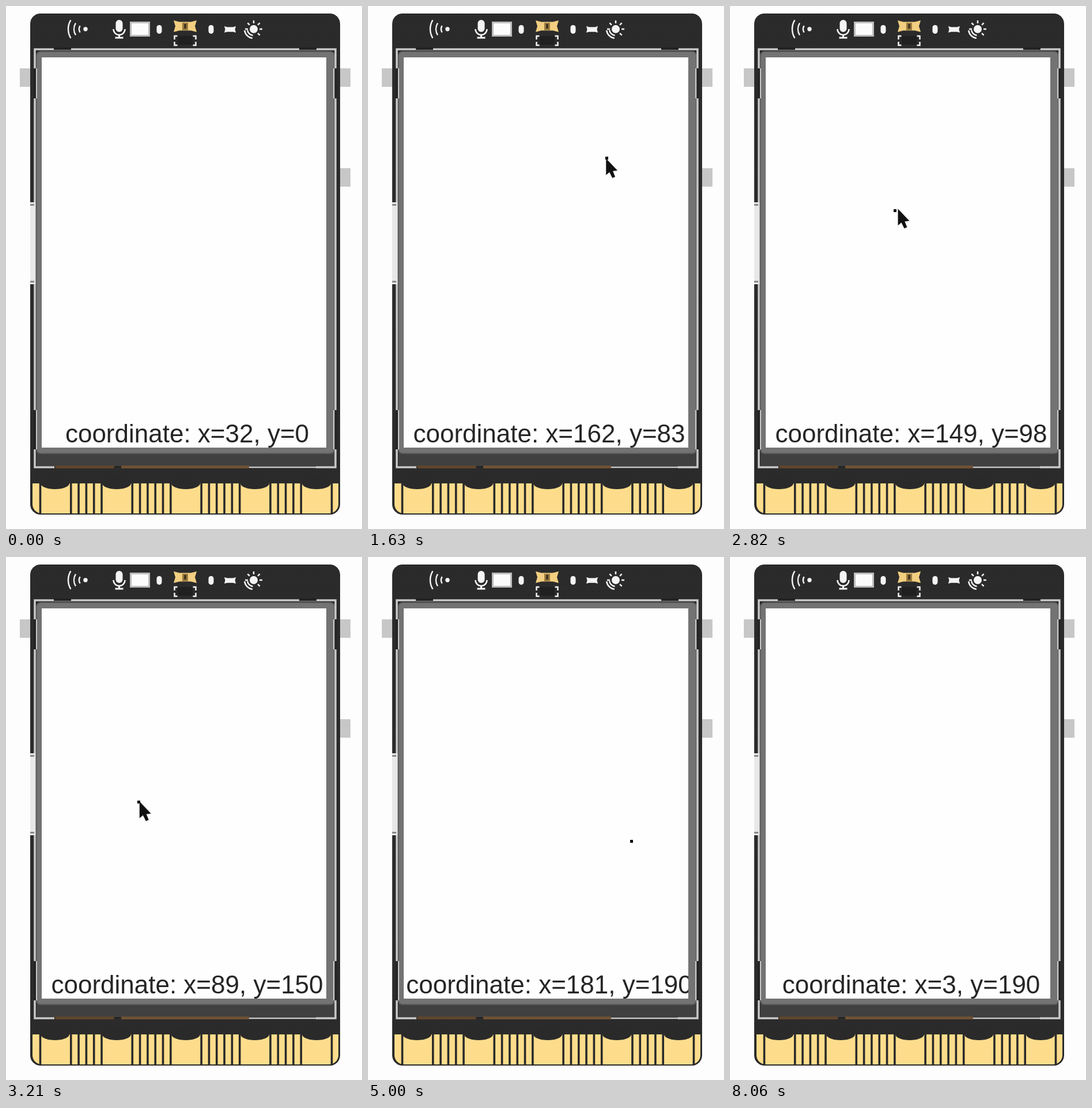
Write an HTML page with a canvas that moves like this. It is 618x906 px and loops after 8.19 s.

```html
<!DOCTYPE html>
<html lang="en">
<head>
<meta charset="utf-8">
<title>Touch coordinates</title>
<style>
html, body { margin: 0; width: 100%; height: 100%; overflow: hidden; background: #fdfdfd; }
canvas { display: block; }
</style>
</head>
<body>
<canvas id="stage" width="618" height="906"></canvas>
<script>
const LOOP = 8190, REFRESH = 100, POINTER_END = 3400, RELEASE = 7100;
const MIDDLE = 311;
const INK = '#f4f4f4', SILVER = '#c9c9c9', DARK = '#2a2a2a';
const stage = document.getElementById('stage');
const view = stage.getContext('2d');
const board = document.createElement('canvas');
board.width = stage.width;
board.height = stage.height;
const art = board.getContext('2d');

// Turning points of the touch in device pixels
const path = [
  { t: 100, x: 32, y: 0 },
  { t: 1500, x: 162, y: 83 },
  { t: 1600, x: 171, y: 82 },
  { t: 2700, x: 149, y: 98 },
  { t: 2800, x: 109, y: 125 },
  { t: 3600, x: 55, y: 191 },
  { t: 4700, x: 90, y: 192 },
  { t: 4900, x: 181, y: 190 },
  { t: 5000, x: 192, y: 190 },
  { t: 5900, x: 195, y: 190 },
  { t: 6600, x: 188, y: 190 },
  { t: RELEASE, x: 3, y: 190 }
];

function touchAt(t) {
  const next = path.findIndex(p => p.t >= t);
  if (next <= 0) return path.at(next);
  const a = path[next - 1], b = path[next];
  const k = (t - a.t) / (b.t - a.t);
  return { x: Math.round(a.x + (b.x - a.x) * k), y: Math.round(a.y + (b.y - a.y) * k) };
}

const toStage = p => ({ x: 62 + p.x * 2.06, y: 90.7 + p.y * 2.1125 });

function rect(color, x0, y0, x1, y1, radius = 0) {
  art.fillStyle = color;
  art.beginPath();
  art.roundRect(x0, y0, x1 - x0, y1 - y0, radius);
  art.fill();
}

function polygon(ctx, color, points) {
  ctx.fillStyle = color;
  ctx.beginPath();
  points.forEach(([x, y]) => ctx.lineTo(x, y));
  ctx.closePath();
  ctx.fill();
}

function line(color, width, ...points) {
  art.strokeStyle = color;
  art.lineWidth = width;
  art.beginPath();
  points.forEach(([x, y]) => art.lineTo(x, y));
  art.stroke();
}

function arc(x, y, r, from, to) {
  art.strokeStyle = INK;
  art.lineWidth = 2.5;
  art.beginPath();
  art.arc(x, y, r, from, to);
  art.stroke();
}

function disc(color, x, y, rx, ry = rx) {
  art.fillStyle = color;
  art.beginPath();
  art.ellipse(x, y, rx, ry, 0, 0, 7);
  art.fill();
}

// Bar with flared ends and a narrower waist
function bow(color, x, y, w, h) {
  const quarter = (sx, sy) => [[w, h], [w * 0.5, h * 0.75]].map(([a, b]) => [x + sx * a, y + sy * b]);
  polygon(art, color, [
    ...quarter(-1, -1), ...quarter(1, -1).reverse(), [x + w * 0.85, y],
    ...quarter(1, 1), ...quarter(-1, 1).reverse(), [x - w * 0.85, y]
  ]);
}

const button = (x, y) => rect('#c7c7c7', x, y, x + 18, y + 32);

function drawBody() {
  rect('#fdfdfd', 0, 0, stage.width, stage.height);
  button(24, 108);
  button(580, 108);
  button(580, 281);
  art.save();
  art.beginPath();
  art.roundRect(42, 13, 538, 868, 18);
  art.clip();
  rect('#2c2c2c', 42, 13, 580, 881);
  art.fillStyle = '#272727';
  for (let row = 0; row < 217; row++)
    for (let x = 43 + row % 2 * 2; x < 580; x += 4) art.fillRect(x, 14 + row * 4, 2, 2);
  drawContacts();
  art.restore();
}

function drawContacts() {
  const center = 312, pitch = 13.316;
  const notches = [-227, -120, 0, 120, 227].map(dx => center + dx);
  rect('#fddd8c', 46, 827, 577, 879, [0, 0, 16, 16]);
  for (let i = -19; i <= 19; i++) {
    const x = center + 0.5 + i * pitch;
    if (notches.every(notch => Math.abs(x - notch) > 22)) rect(DARK, x - 1.8, 827, x + 1.8, 881);
  }
  notches.forEach(x => disc(DARK, x, 827, 25, 10));
}

// One half of the silver outline; it steps inwards beside the clips.
function drawOutline(side) {
  const outer = MIDDLE + side * 261, inner = outer - side * 3;
  line(SILVER, 3.5, [MIDDLE, 75], [outer, 75], [outer, 108]);
  line(SILVER, 2, [inner, 108], [inner, 160]);
  line(SILVER, 3.5, [outer, 160], [outer, 700]);
  line(SILVER, 2, [inner, 700], [inner, 768]);
  line(SILVER, 3.5, [outer, 768], [outer, 799], [outer - side * 34, 799]);
  const tab = MIDDLE + side * 213;
  rect('#222', tab - 15, 72, tab + 15, 76);
}

function drawFrame() {
  rect('#242424', 48, 75, 574, 800);
  rect('#404040', 53, 764, 571, 797);
  rect('#5e452d', 85, 796, 188, 801, 3);
  rect('#6f5133', 200, 796, 422, 801);
  line(SILVER, 2.5, [422, 799], [540, 799]);
  rect('#5e5e5e', 52, 78, 571, 776, 8);
  rect('#737373', 54, 80, 569, 774, 6);
  rect('#fefefe', 62, 89, 556, 765);
  drawOutline(-1);
  drawOutline(1);
  rect('#e8e8e8', 42, 340, 51, 482);
  for (const y of [343, 476]) rect('#888', 42, y, 49, y + 3);
}

function drawMicrophone(x, y) {
  rect(INK, x - 6, y - 16, x + 6, y + 5, 6);
  arc(x, y, 10, 0, Math.PI);
  line(INK, 3, [x, y + 10], [x, y + 15]);
  line(INK, 3, [x - 7, y + 15], [x + 7, y + 15]);
}

function drawSun(x, y) {
  disc(INK, x, y, 7);
  for (let i = -4; i <= 1; i++) {
    const a = i * Math.PI / 4, c = Math.cos(a), s = Math.sin(a);
    line(INK, 2.5, [x + c * 10, y + s * 10], [x + c * 15, y + s * 15]);
  }
  for (const r of [11, 16]) arc(x, y, r, 1.7, 3);
}

function drawChip() {
  bow('#f2cf80', MIDDLE, 35, 20, 10);
  rect('#9b7b3f', MIDDLE - 5, 29, MIDDLE + 5, 42);
  rect('#45381f', MIDDLE - 2, 31, MIDDLE + 2, 39);
  rect('#202020', MIDDLE - 13, 52, MIDDLE + 13, 67);
  for (const side of [-1, 1])
    for (const up of [-1, 1]) {
      const x = MIDDLE + side * 18.5, y = 60 + up * 8;
      line(INK, 2.5, [x - side * 5, y], [x, y], [x, y - up * 6]);
    }
}

function drawIcons() {
  disc(INK, 138, 40, 3.7);
  for (const r of [11, 20, 30]) arc(138, 40, r, Math.PI - 0.55, Math.PI + 0.55);
  drawMicrophone(196.5, 40);
  rect('#bdbdbd', 215, 27, 250, 53);
  rect('#fcfcfc', 218, 30, 247, 50);
  for (const x of [266, 356]) rect(INK, x - 4.5, 33, x + 4.5, 48, 4.5);
  drawChip();
  bow(INK, 389, 40.5, 10, 5.5);
  drawSun(430, 40);
}

function drawCursor(x, y) {
  view.save();
  view.translate(x, y);
  polygon(view, '#111', [[0, 0], [0, 29], [6, 24], [11, 34], [16, 32], [12, 22], [20, 21]]);
  view.strokeStyle = '#aaa';
  view.setLineDash([1, 2]);
  view.lineWidth = 1;
  view.stroke();
  view.restore();
}

function draw(t) {
  const tick = Math.floor(t / REFRESH) * REFRESH;
  const shown = touchAt(tick - REFRESH); // the label lags one refresh
  view.drawImage(board, 0, 0);

  view.save();
  view.beginPath();
  view.rect(62, 89, 494, 676);
  view.clip();
  view.font = '44px "Liberation Sans", Arial, sans-serif';
  view.textAlign = 'center';
  view.fillStyle = '#262626';
  view.fillText(`coordinate: x=${shown.x}, y=${shown.y}`, 314.5, 756);

  if (tick >= REFRESH && tick < RELEASE) {
    const dot = toStage(touchAt(tick));
    if (tick < POINTER_END) {
      const old = toStage(shown);
      drawCursor(dot.x + (old.x - dot.x) * 0.06, dot.y + (old.y - dot.y) * 0.06);
    }
    view.fillStyle = '#080808';
    view.fillRect(Math.round(dot.x - 2.5), Math.round(dot.y - 2.5), 5, 5);
  }
  view.restore();
}

function play() {
  draw(performance.now() % LOOP);
  requestAnimationFrame(play);
}

drawBody();
drawFrame();
drawIcons();
play();
</script>
</body>
</html>
```
